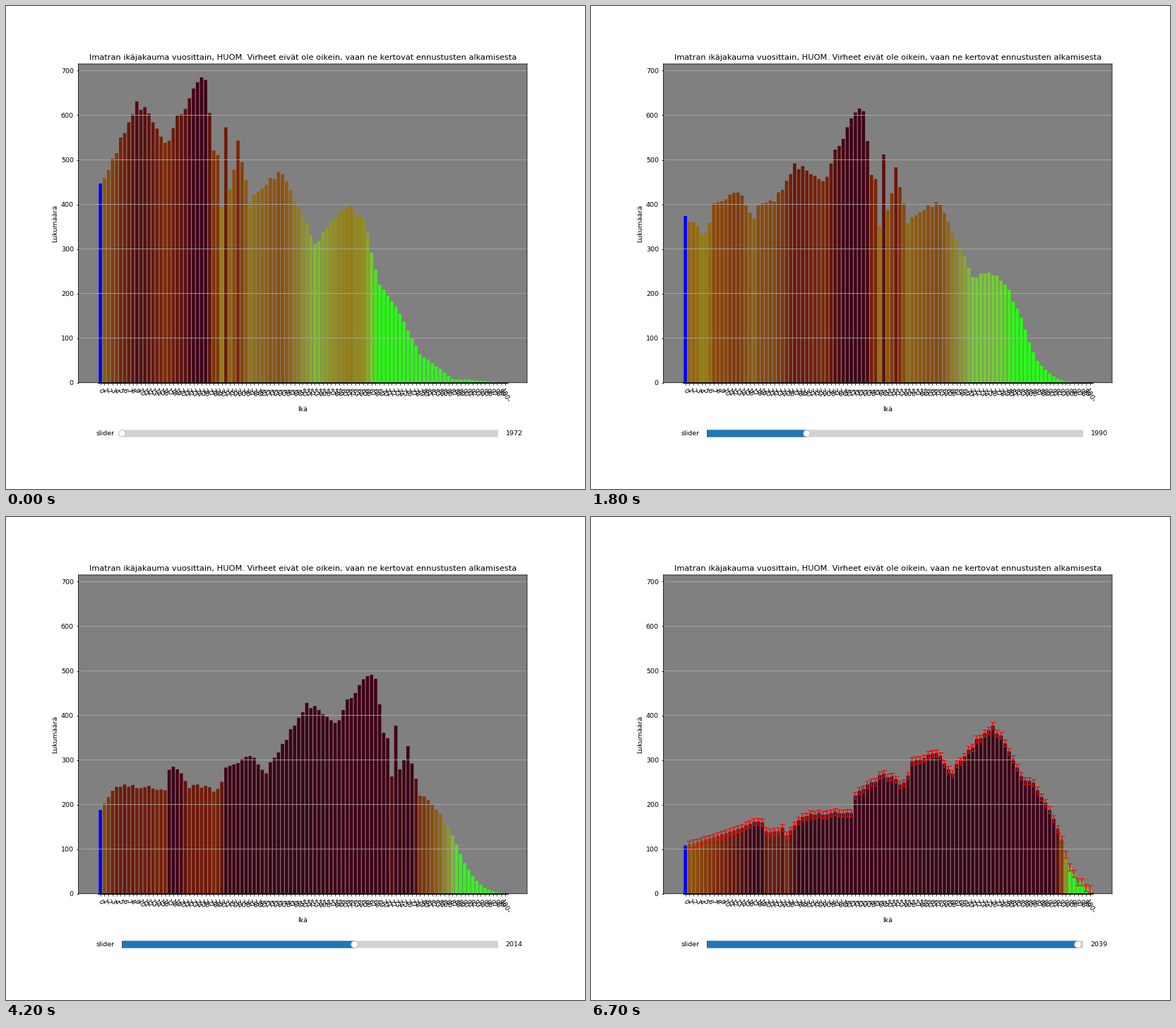
Write a matplotlib script that moves like this. It is 820 px wide and 683 px high and loops after 6.8 s.

```python
import numpy as np
import matplotlib.pyplot as plt
from matplotlib.animation import FuncAnimation
from matplotlib.colors import LinearSegmentedColormap
from matplotlib.widgets import Slider

W, H = 820, 683
DPI = W / 12
FIRST, LAST, FORECAST = 1972, 2039, 2021
ERROR = 8
ages = np.arange(101)
plt.rcParams["path.snap"] = False

# Key points: year of birth and cohort size at birth, or in the first year.
cohort_points = [
    (1872, 1), (1885, 9), (1893, 65), (1898, 155), (1903, 222), (1907, 370),
    (1911, 400), (1915, 358), (1919, 310), (1927, 475), (1935, 410),
    (1938, 545), (1940, 426), (1941, 580), (1942, 390), (1943, 515),
    (1944, 513), (1946, 689), (1952, 610), (1956, 530), (1961, 625),
    (1963, 622), (1972, 447), (1973, 405), (1977, 463), (1983, 411),
    (1985, 340), (1990, 375), (1997, 313), (1998, 258), (2007, 250),
    (2010, 245), (2014, 189), (2015, 208), (2018, 176), (2019, 137),
    (2020, 145), (2025, 130), (2039, 108),
]
births = np.arange(FIRST - 100, LAST + 1)
cohorts = np.interp(births, *zip(*cohort_points))
jitter = np.random.default_rng(7).uniform(-0.02, 0.02, len(births))
cohorts *= 1 + np.where((births < FORECAST) & (births != FIRST), jitter, 0)


def survival(age, year):
    """Gompertz survival; life expectancy rises steadily."""
    return np.exp(-np.exp((age - 81 - 0.14 * (year - FIRST)) / 7.5))


def population(year):
    """Head count for every age at the end of the year."""
    born = year - ages
    start = np.maximum(born, FIRST)
    alive = survival(ages, year) / survival(start - born, FIRST)
    drift = 1 - 0.0055 * np.maximum(min(year, 2020) - start, 0)

    # Young adults move away, and some of them return later.
    strength = np.interp(born, [1950, 1960, 1985, 1995], [0, .24, .24, .32])
    strength = strength * np.clip((year - 1980) / 15, 0, 1)
    leaving = np.exp(-np.maximum(ages - 20, 0) / 40) / (1 + np.exp(20.5 - ages))
    arriving = np.where(born >= 2019, 0.01 * np.minimum(ages, 17), 0)

    size = cohorts[born - births[0]]
    return np.round(size * alive * drift * (1 - strength * leaving)
                    * (1 + arriving))


# Colour follows the size of an age group relative to the newborns.
stops = [(0, (44, 248, 24)), (.15, (120, 204, 50)), (.3, (147, 150, 32)),
         (.5, (148, 92, 8)), (.75, (122, 28, 5)), (1, (62, 0, 22))]
cmap = LinearSegmentedColormap.from_list(
    "ages", [(p, tuple(v / 255 for v in rgb)) for p, rgb in stops], N=512)

fig = plt.figure(figsize=((W + .01) / DPI, (H + .01) / DPI), dpi=DPI)
ax = fig.add_axes([0.125, 0.22, 0.775, 0.66], facecolor="gray")
bars = ax.bar(ages, population(FIRST), width=0.8)
ax.errorbar(ages, 0 * ages, yerr=0, fmt="none", ecolor="black",
            capsize=4, capthick=1.5)
_, caps, (stems,) = ax.errorbar(ages[1:], 0 * ages[1:], yerr=ERROR,
                                fmt="none", ecolor="red", capsize=4)
ax.set(xlim=(-5.44, 105.44), ylim=(0, 715), xlabel="Ikä", ylabel="Lukumäärä")
ax.set_title("Imatran ikäjakauma vuosittain, HUOM. Virheet eivät ole oikein, "
             "vaan ne kertovat ennustusten alkamisesta")
ax.set_xticks(ages, [str(a) for a in ages[:-1]] + ["100-"], rotation=-60)
ax.grid(axis="y")

slider = Slider(fig.add_axes([0.2, 0.1, 0.65, 0.03]), "slider", FIRST, 2040,
                valinit=FIRST, valstep=1, valfmt="%d")
slider.drawon = False


def draw(frame):
    year = FIRST + frame
    counts = population(year)
    colors = cmap(np.clip(counts / counts[0] - 0.5, 0, 1))
    colors[0] = (0, 0, 1, 1)
    for bar, count, color in zip(bars, counts, colors):
        bar.set_height(count)
        bar.set_facecolor(color)

    low, high = counts[1:] - ERROR, counts[1:] + ERROR
    caps[0].set_ydata(low)
    caps[1].set_ydata(high)
    stems.set_segments([[(a, lo), (a, hi)]
                        for a, lo, hi in zip(ages[1:], low, high)])
    for part in (*caps, stems):
        part.set_visible(year >= FORECAST)

    slider.set_val(year)
    return []


anim = FuncAnimation(fig, draw, frames=LAST - FIRST + 1, interval=100,
                     repeat=True, repeat_delay=0)
plt.show()
```
